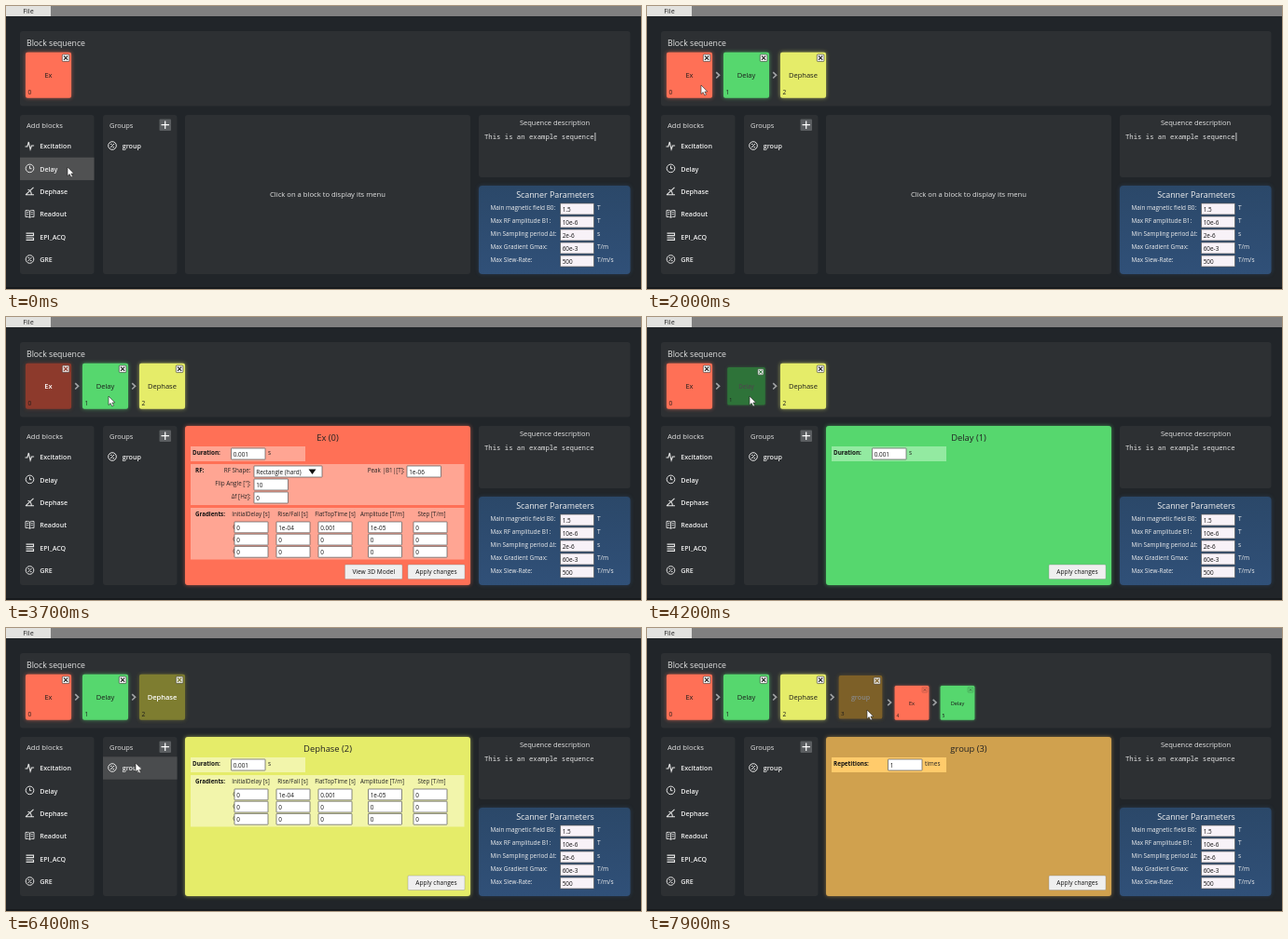
An HTML page that plays this animation: 681x304 px, repeating every 8 s.

```html
<!DOCTYPE html>
<html lang="en">
<head>
<meta charset="utf-8">
<title>Sequence editor</title>
<style>
html, body { margin: 0; width: 100%; height: 100%; overflow: hidden; background: #212529; }
svg { display: block; width: 681px; height: 304px; font-family: "Open Sans", "Noto Sans", sans-serif; }
.mono { font-family: "Noto Sans Mono", "DejaVu Sans Mono", monospace; }
</style>
</head>
<body>
<svg viewBox="0 0 681 304">
  <defs>
    <filter id="glow" x="-30%" y="-30%" width="160%" height="160%"><feGaussianBlur stdDeviation="2.2"/></filter>
    <linearGradient id="blue" x1="0" y1="0" x2="0" y2="1">
      <stop offset="0" stop-color="#2b4869"/><stop offset="1" stop-color="#305078"/>
    </linearGradient>
  </defs>
  <g id="base"></g>
  <g id="live"></g>
</svg>
<script>
const LOOP = 8000;
const $ = id => document.getElementById(id);

// Drawing helpers; text is placed by its vertical middle.
const rect = (x, y, w, h, fill, r = 0, more = '') =>
  `<rect x="${x}" y="${y}" width="${w}" height="${h}" rx="${r}" fill="${fill}" ${more}/>`;
const text = (x, y, size, str, fill = '#111', more = '') =>
  `<text x="${x}" y="${y + size * 0.35}" font-size="${size}" fill="${fill}" ${more}>${str}</text>`;
const path = (d, stroke, width = 1, more = '') =>
  `<path d="${d}" fill="none" stroke="${stroke}" stroke-width="${width}" ${more}/>`;
const MID = 'text-anchor="middle"', END = 'text-anchor="end"';
const BOLD = 'font-weight="700"', SEMI = 'font-weight="600"';
const LIGHT = '#e4e4e4', PANEL = '#2d3033';

const mix = (a, b, k) => {
  const part = (c, i) => parseInt(c.slice(1 + 2 * i, 3 + 2 * i), 16);
  return `rgb(${[0, 1, 2].map(i => Math.round(part(a, i) + (part(b, i) - part(a, i)) * k))})`;
};
const ramp = (t, a, b) => Math.max(0, Math.min(1, (t - a) / (b - a)));
const ease = k => k * k * (3 - 2 * k);

// Interpolates rows of [time, ...values].
function track(keys, t, curve = k => k) {
  const n = keys.findIndex(k => k[0] > t);
  if (n === 0) return keys[0].slice(1);
  if (n < 0) return keys[keys.length - 1].slice(1);
  const a = keys[n - 1], b = keys[n], k = curve(ramp(t, a[0], b[0]));
  return a.slice(1).map((v, i) => v + (b[i + 1] - v) * k);
}

const KINDS = {
  Ex: { fill: '#ff7056', dark: '#8d3a2c', inner: '#ffa593' },
  Delay: { fill: '#56d76e', dark: '#2e7339', inner: '#93eaa1' },
  Dephase: { fill: '#e5ec69', dark: '#7e7d30', inner: '#f2f5ab' },
  group: { fill: '#d0a14e', dark: '#7d6028', inner: '#ffcb6b' }
};
const BLOCKS = [
  { kind: 'Ex', x: 45.5, y: 74.3, born: -999, click: 2200 },
  { kind: 'Delay', x: 106.5, y: 74.3, born: 100, click: 4050 },
  { kind: 'Dephase', x: 167.5, y: 74.3, born: 1000, click: 5000 },
  { kind: 'group', x: 229, y: 74.3, born: 6800, click: 7700 },
  { kind: 'Ex', x: 284, y: 80.3, born: 6800, size: 0.75 },
  { kind: 'Delay', x: 333, y: 80.3, born: 6800, size: 0.75 }
];
const SWITCH = 150; // delay between a click and the menu change
const POINTER = [
  [0, 66, 173], [250, 66, 173], [600, 61, 195], [1250, 61, 195], [1900, 58, 85], [3000, 58, 85],
  [3650, 110, 85], [4500, 110, 85], [4950, 188, 86], [5850, 188, 86], [6350, 139, 145],
  [6900, 139, 145], [7550, 236, 88]
];
const ROWS = ['Excitation', 'Delay', 'Dephase', 'Readout', 'EPI_ACQ', 'GRE'];
const rowY = i => 150.5 + 24.4 * i;

const ring = '<circle r="4.3" fill="none" stroke="#e4e4e4"/>';
const loopIcon = ring + path('M-2 2L2-2M-2-1.6H-.4M.4 1.6H2', LIGHT, 1);
const ICONS = [
  path('M-5 1H-2.6L-1.2-4L.6 4L2 0H4.6', LIGHT, 1.1),
  ring + path('M0-2.6V.3H2', LIGHT),
  path('M-4.5 4H4.5M-4.5 4L4-4M-2-1.5Q1.5-.5 1.8 3.5', LIGHT, 1.1),
  path('M0-3V4Q-2 2.8-4.5 3.4V-3.7Q-2-4.2 0-3Q2-4.2 4.5-3.7V3.4Q2 2.8 0 4M-3.2-1.6H-1.2M-3.2.6H-1.2M1.2-1.6H3.2M1.2.6H3.2', LIGHT, 0.9),
  path('M-4-3.5H4V-1H-4M-4 1.4H4M4 1.4V3.8H-4', LIGHT, 1.1),
  loopIcon
];
const icon = (x, y, body) => `<g transform="translate(${x} ${y})">${body}</g>`;
const listItem = (x, y, name, body) =>
  icon(x, y - 0.5, body) + text(x + 10.7, y + 0.3, 7.1, name, '#f0f0f0', SEMI);
const input = (x, y, value, w = 36.5, h = 12, fill = '#fff') =>
  rect(x, y, w, h, fill, 0.5, 'stroke="#555" stroke-width=".7"') + text(x + 2.2, y + h / 2 + 0.7, 6.4, value);
const button = (x, w, label) =>
  rect(x, 266, w, 15.5, '#efefef', 1, 'stroke="#888" stroke-width=".4"') + text(x + w / 2, 274, 6.6, label, '#111', MID);

function drawBase() {
  let s = rect(0, 0, 681, 11, '#808080') + rect(0, 0, 48, 11, '#e2e2df') + text(24, 5.5, 7.2, 'File', '#222', MID);
  s += rect(0, 302, 681, 2, '#171a1d');
  for (const [x, y, w, h] of [[15, 27, 654.5, 80.5], [15, 117, 79.5, 171], [104, 117, 79.5, 171],
    [192, 117, 306, 171], [507, 117, 162.5, 67]]) s += rect(x, y, w, h, PANEL, 3);
  s += text(22, 40, 8.7, 'Block sequence', LIGHT) + text(22, 128, 7.7, 'Add blocks', LIGHT);
  s += text(111, 128, 7.4, 'Groups', LIGHT) + rect(164.5, 121.5, 12.5, 12.5, '#5b5e61', 1);
  s += path('M166.5 127.7H175M170.7 123.5V132', '#fff', 1.2);
  s += text(588.5, 125, 7.5, 'Sequence description', LIGHT, MID);
  s += text(513, 140.3, 7.28, 'This is an example sequence', LIGHT, 'class="mono"');

  s += rect(507, 193, 162.5, 95, '#305078', 4, 'filter="url(#glow)" opacity=".5"');
  s += rect(507, 193, 162.5, 95, 'url(#blue)', 4) + text(589, 203, 8.9, 'Scanner Parameters', '#f2f2f2', MID);
  [['Main magnetic field B0:', '1.5', 'T'], ['Max RF amplitude B1:', '10e-6', 'T'],
    ['Min Sampling period Δt:', '2e-6', 's'], ['Max Gradient Gmax:', '60e-3', 'T/m'],
    ['Max Slew-Rate:', '500', 'T/m/s']].forEach(([label, value, unit], i) => {
    const y = 217 + 14 * i;
    s += text(519.5, y, 6.4, label, '#f0f0f0') + input(594.5, y - 5, value, 36, 12, '#f8f2f8') +
      text(634, y, 6.5, unit, '#f0f0f0');
  });
  $('base').innerHTML = s;
}

function gradients(y, inner) {
  let s = rect(198, y, 293.5, 55.5, inner) + text(203, y + 7, 6.2, 'Gradients:', '#111', BOLD);
  const cols = [[245, 262.5, 'InitialDelay [s]'], [290, 307.5, 'Rise/Fall [s]'], [335, 353, 'FlatTopTime [s]'],
    [388.5, 403.5, 'Amplitude [T/m]'], [437, 456.5, 'Step [T/m]']];
  const first = ['0', '1e-04', '0.001', '1e-05', '0'];
  for (const [, mid, label] of cols) s += text(mid, y + 7, 6.2, label, '#222', MID);
  ['Gx:', 'Gy:', 'Gz:'].forEach((axis, r) => {
    const top = y + 15 + 13.2 * r;
    s += text(244 - 8, top + 5.7, 6.4, axis, '#222', 'text-anchor="middle" dx="12"');
    cols.forEach(([x], c) => s += input(x, top, r ? '0' : first[c], 36, 11.8));
  });
  return s;
}

function menu(index) {
  if (index < 0) return text(345, 202.5, 7.65, 'Click on a block to display its menu', LIGHT, MID);
  const { kind } = BLOCKS[index], { fill, inner } = KINDS[kind];
  let s = rect(192, 117, 306, 171, fill, 3, 'filter="url(#glow)" opacity=".6"') + rect(192, 117, 306, 171, fill, 3);
  s += text(345, 129.5, 9.4, `${kind} (${index})`, '#222', MID) + rect(198, 139, 123, 16, inner);
  if (kind === 'group') {
    s += text(200, 146, 6.3, 'Repetitions:', '#111', BOLD) + input(258.5, 141, '1') + text(298, 146, 6.4, 'times', '#222');
  } else {
    s += text(200, 146, 6.3, 'Duration:', '#111', BOLD) + input(241.5, 141, '0.001') + text(281, 146, 6.4, 's', '#222');
  }
  if (kind === 'Ex') {
    s += rect(198, 158, 293.5, 44, inner) + text(203, 165, 6.3, 'RF:', '#111', BOLD);
    s += text(262.5, 165, 6.3, 'RF Shape:', '#222', END) + input(266, 160, 'Rectangle (hard)', 73);
    s += '<path d="M324.5 163.5h8l-4 5.5z" fill="#111"/>';
    s += text(427.5, 165, 6.3, 'Peak |B1|[T]:', '#222', END) + input(430, 160, '1e-06');
    s += text(262.5, 179, 6.3, 'Flip Angle [º]:', '#222', END) + input(266, 174, '10');
    s += text(262.5, 192.5, 6.3, 'Δf [Hz]:', '#222', END) + input(266, 188, '0');
    s += gradients(205, inner) + button(363.5, 61.5, 'View 3D Model');
  }
  if (kind === 'Dephase') s += gradients(158, inner);
  return s + button(431, 61, 'Apply changes');
}

function block(b, i, t, selected) {
  const { fill, dark } = KINDS[b.kind], age = t - b.click, pressed = age >= 0 && age < 300;
  const active = pressed || selected === i;
  const dip = pressed ? track([[0, 1], [100, 0.7], [200, 0.95], [250, 1]], age)[0] : 1;
  const scale = (b.size || 1) * dip * (0.6 + 0.4 * ease(ramp(t, b.born, b.born + 200)));
  const color = active ? mix(fill, dark, ramp(age, 0, 140)) : fill;
  const ink = active ? mix('#1a1a1a', '#ffffff', ramp(age, 110, 300)) : '#1a1a1a';
  let s = rect(-24.5, -24.5, 49, 49, color, 2, 'filter="url(#glow)" opacity=".65"') + rect(-24.5, -24.5, 49, 49, color, 2);
  s += text(0, 0.3, 7.5, b.kind, ink, `${MID} ${active && age > SWITCH ? SEMI : ''}`);
  s += text(-22, 18, 6.5, i, '#1a1a1a');
  s += `<g opacity="${b.size ? 0.5 : active ? 0.85 : 1}">` +
    rect(14.8, -22.3, 7.6, 7.6, b.size ? 'none' : '#f4f4f4', 1, 'stroke="#333" stroke-width=".6"') +
    path('M16.5-20.6l4.2 4.2m0-4.2l-4.2 4.2', active ? dark : '#222', 1.2) + '</g>';
  return `<g transform="translate(${b.x} ${b.y}) scale(${scale})">${s}</g>`;
}

function draw(t) {
  const selected = BLOCKS.reduce((last, b, i) => t >= b.click + SWITCH ? i : last, -1);
  const [px, py] = track(POINTER, t, ease);
  let s = '';

  // Hovered rows, lighter while pressed.
  const row = Math.floor((py - 138.3) / 24.4);
  if (row >= 0 && px > 15 && px < 94) {
    const down = t < 100 || (t > 900 && t < 1000);
    s += rect(15, rowY(row) - 12.2, 79.5, 24.4, down ? '#505152' : '#404244');
  }
  if (row === 0 && px > 104 && px < 183) s += rect(104, 138.3, 79.5, 24.4, '#4a4c4e');
  ROWS.forEach((name, i) => s += listItem(25.5, rowY(i), name, ICONS[i]));
  s += listItem(114, 150.5, 'group', loopIcon);

  if (t < BLOCKS[0].click && (t + 360) % 1060 < 530) s += rect(631.5, 136, 0.8, 9, '#eee');

  s += menu(selected);
  BLOCKS.forEach((b, i) => {
    if (t < b.born) return;
    if (i) {
      const x = [0, 76, 137, 198.5, 260, 308.5][i], y = i > 3 ? 80 : 74.3;
      s += path(`M${x - 1.8} ${y - 3.2}l3.4 3.2l-3.4 3.2`, '#a0a2a4', 1.6);
    }
    s += block(b, i, t, selected);
  });

  s += `<path transform="translate(${px} ${py})" d="M0 0V9.6L2.2 7.6L3.8 11L5.5 10.2L3.9 7H6.8Z"
    fill="#fff" stroke="#222" stroke-width=".6"/>`;
  $('live').innerHTML = s;
}

drawBase();
const start = performance.now();
function tick() {
  draw((performance.now() - start) % LOOP);
  requestAnimationFrame(tick);
}
tick();
</script>
</body>
</html>
```
